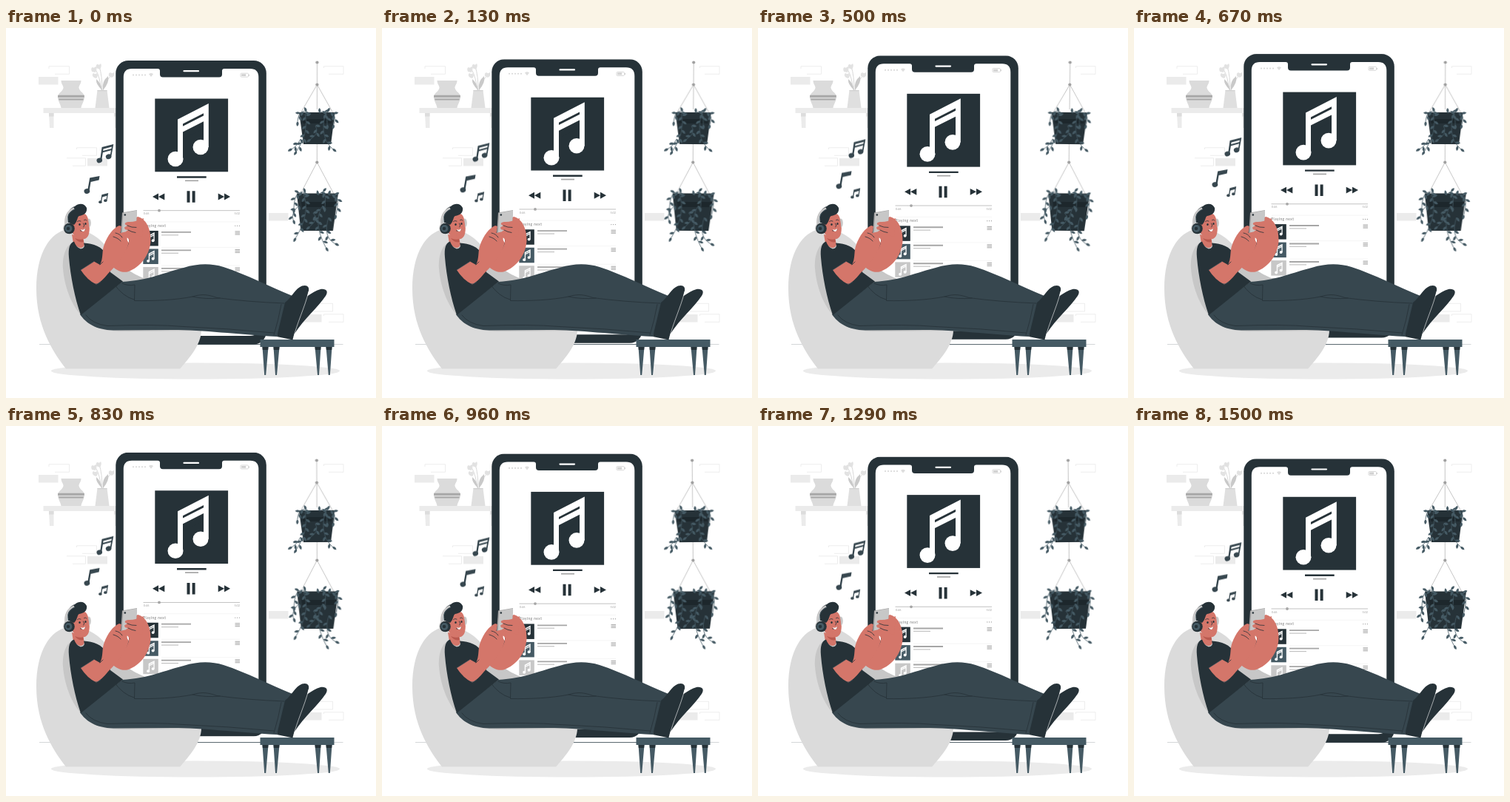
Animation, 500 px wide and 500 px high, one loop 1.54 s. Source, as an HTML page:

```html
<!DOCTYPE html>
<html lang="en">
<head>
<meta charset="utf-8">
<title>Relaxing with music</title>
<style>
  html, body { margin: 0; width: 100%; height: 100%; overflow: hidden; background: #fff; }
  svg { display: block; width: 100vw; height: 100vh; }
  text { font-family: Lato, "Open Sans", sans-serif; }
  .bob { animation: bob 1540ms linear infinite; }
  .swing { transform-origin: 420px 172px; animation: swing 1540ms linear infinite; }
  @keyframes bob {
    0%, 100% { transform: translateY(0); }
    47% { transform: translateY(-9.6px); }
    98.5% { transform: translateY(.5px); }
  }
  @keyframes swing {
    0%, 100% { transform: rotate(.08deg); }
    24% { transform: rotate(1deg); }
    73.5% { transform: rotate(-1deg); }
  }
  .ink { fill: #263238; }
  .slate { fill: #455a64; }
  .pale { fill: #ebebeb; }
  .skin { fill: #d4766a; }
  .line { fill: none; stroke: #263238; stroke-width: .8; stroke-linecap: round; stroke-linejoin: round; }
  .crease { fill: none; stroke: #263238; stroke-width: .8; stroke-linecap: round; }
  .brick { fill: none; stroke: #e6e6e6; stroke-width: .7; }
  .cord { fill: none; stroke: #b5b5b5; stroke-width: .8; }
</style>
</head>
<body>
<svg viewBox="0 0 500 500">
  <defs>
    <g id="note">
      <path d="M232 123.500L273.800 102V161H267V135L239 149V177H232Z"/>
      <ellipse cx="229" cy="177" rx="10.500" ry="10.300"/>
      <ellipse cx="263" cy="161" rx="10.500" ry="10.300"/>
    </g>
    <g id="cuts">
      <path d="M239 129.500L267 115.200V118.400L239 132.700ZM239 140.500L267 126.300V136L239 150Z"/>
    </g>
    <g id="row">
      <path fill="#a6a6a6" d="M210 275h40v1.800h-40Z"/>
      <path fill="#c2c2c2" d="M210 279.200h23v1.200h-23Z"/>
      <path fill="none" stroke="#999" stroke-width=".9" d="M309.500 275h6.500m-6.500 2h6.500m-6.500 2h6.500"/>
      <path stroke="#eee" stroke-width=".6" d="M210 296.500H316"/>
    </g>
    <path id="skip" class="ink" d="M198 228l8-4.400v8.800ZM206 228l8.300-4.400v8.800Z"/>
  </defs>

  <!-- wall -->
  <path class="pale" d="M44 66h26.500v10.500H44ZM110 176h27v10.500h-27ZM355 250h26.500v10.500H355ZM400 387h26.500v10.500H400Z"/>
  <path class="brick" d="M58 55V51.800H85.500V62.300H66M429.500 54V51.800H456V62.300H436M95.500 164V161.800H122.500V172.300H103M82 175.800H107.500V186.300H90M420 372.300H441.500V383H414.500M429.500 389V386.800H456V397.300H436"/>
  <path stroke="#37474f" stroke-width=".7" d="M45 427.600H455.500" opacity=".35"/>
  <path stroke="#37474f" stroke-width=".8" d="M258 427.600H344"/>

  <!-- shelf -->
  <path class="pale" d="M50.500 108H152v7H50.500ZM58 115h6.500v20H59ZM146 115h5v20h-4Z"/>
  <path fill="#dcdcdc" d="M58 115h6.500v4.500H58ZM146 115h4v4.500h-4Z"/>
  <path fill="#dbdbdb" d="M74.500 71H101.500C101.500 76 98 78 98.500 81C99.500 86 106 88 106 93C106 99 102 103 101.500 108H74.500C74 103 70 99 70 93C70 88 76.500 86 77.500 81C78 78 74.500 76 74.500 71Z"/>
  <path fill="#a8a8a8" d="M70.200 90.800H105.800V93.800H70ZM71 95.500H105L104.200 97.500H71.800Z"/>
  <path fill="none" stroke="#cfcfcf" stroke-width=".8" d="M129 85Q127 66 121 56M130 85Q130 64 126 52M131 85Q134 70 144 63"/>
  <path fill="#c9c9c9" d="M130 84Q121 76 122 69Q128 74 130 84ZM131 84Q129 72 138 65Q140 74 131 84Z"/>
  <path fill="#e2e2e2" d="M116 59Q114 54 117 53Q119 55 121 52Q124 54 121 60ZM122 54Q121 49 124 49Q126 51 128 48Q130 51 127 56ZM119 67Q115 64 118 61Q121 63 123 61Q125 65 122 68ZM139 65Q138 61 141 60Q143 62 146 60Q148 64 143 67Z"/>
  <path fill="#dfdfdf" d="M123.500 84H136.500L139.500 108H120.500Z"/>
  <path fill="#d0d0d0" d="M123.500 84h13v1.300h-13Z"/>

  <!-- big phone -->
  <g class="bob">
    <rect class="ink" x="148.300" y="44" width="203.500" height="383.500" rx="17"/>
    <path fill="#fff" d="M170 55H205Q208 55 208 58V62.500Q208 66.500 212 66.500H288Q292 66.500 292 62.500V58Q292 55 295 55H330Q341.300 55 341.300 66.500V405Q341.300 416 330 416H170Q158.800 416 158.800 405V66.500Q158.800 55 170 55Z"/>
    <path stroke="#fff" stroke-width="2.200" stroke-linecap="round" d="M240.500 58.200H260"/>
    <path stroke="#d9d9d9" stroke-width="2.200" stroke-linecap="round" stroke-dasharray="0 4" d="M172 63.500H189"/>
    <path fill="#dedede" d="M193 62.300Q196 59.800 199 62.300L196 66Z"/>
    <rect x="317" y="61.200" width="10.500" height="5" rx="1.200" fill="none" stroke="#d0d0d0" stroke-width=".8"/>
    <path fill="#d0d0d0" d="M318.200 62.300h6v2.800h-6ZM328 62.800h1v2h-1Z"/>

    <rect class="ink" x="201.300" y="95.500" width="98.800" height="98.800"/>
    <use href="#note" fill="#fff"/>
    <use href="#cuts" class="ink"/>
    <path class="ink" d="M231 200.300h39.700v2.400H231Z"/>
    <path fill="#a6a6a6" d="M242 205.500h18v1.700h-18Z"/>

    <use href="#skip"/>
    <use href="#skip" transform="matrix(-1 0 0 1 501 0)"/>
    <path class="ink" d="M244.500 220.300h4v15.500h-4ZM251.600 220.300h4v15.500h-4Z"/>
    <path stroke="#c2c2c2" stroke-width="1" d="M185.500 246.700H316"/>
    <circle cx="207" cy="246.700" r="1.900" fill="#a6a6a6"/>
    <g font-size="3.800" fill="#a0a0a0">
      <text x="185.800" y="252.300">0:46</text>
      <text x="316" y="252.300" text-anchor="end">5:02</text>
    </g>
    <path stroke="#eee" stroke-width=".6" d="M186 262H316"/>
    <text x="185.300" y="269" font-size="4.800" letter-spacing=".45" fill="#777">Playing next</text>
    <path stroke="#999" stroke-width="1.300" stroke-linecap="round" stroke-dasharray="0 2.800" d="M309.800 267.300H316"/>
    <g id="list"></g>
  </g>

  <!-- floating notes -->
  <g class="bob" fill="#37474f">
    <path d="M129.600 161L145.300 157L142.200 174L140.400 173.800L142 165.200L130.900 168.200L129 180L127 179ZM131.500 163.600L131.200 166L142.400 163L142.900 160.600Z" fill-rule="evenodd"/>
    <ellipse cx="126.300" cy="179" rx="3.800" ry="3.300" transform="rotate(-20 126 179)"/>
    <ellipse cx="138.600" cy="174" rx="3.800" ry="3.300" transform="rotate(-20 138 174)"/>
    <path d="M113.200 202.500L126.500 200L125.600 205.500L114.600 208L112.400 221L110 220.500Z"/>
    <ellipse cx="109.200" cy="220.600" rx="3.900" ry="3.400" transform="rotate(-20 109 220)"/>
    <path d="M129.400 225.300L138.200 223L136.400 233.500L135.200 233.300L136.400 226.800L130.200 228.400L129 236L127.800 235.500Z"/>
    <ellipse cx="127.400" cy="235.200" rx="2.200" ry="1.900"/>
    <ellipse cx="134.300" cy="233.200" rx="2.200" ry="1.900"/>
  </g>

  <!-- hanging plants -->
  <g class="swing">
    <path class="cord" d="M420.300 46.500V76.500L398 115M420.300 76.500L442 115M420.300 157V181.500L397 226M420.300 181.500L444 226M420.300 76.500V110"/>
    <g fill="#a0a0a0">
      <circle cx="420.300" cy="46.500" r="2.100"/><circle cx="420.300" cy="76.500" r="2.100"/><circle cx="420.300" cy="181.500" r="2.100"/>
    </g>
    <path class="ink" d="M396 114H444.500L439 157H402ZM393 223.500H449L442 274H398.500Z"/>
    <path fill="#1d272c" d="M400 123H441L440 129H401ZM399 235H446L445 242H400Z"/>
    <g id="vines"></g>
  </g>

  <!-- floor shadow, stool -->
  <ellipse class="pale" cx="256" cy="463.500" rx="195" ry="11"/>
  <path class="slate" d="M346.500 431H354.500L351.200 469H349.200ZM361.500 431H369.500L366 469H364ZM417.500 431H425.500L423 469H421ZM432.500 431H440.500L437.800 469H435.800Z"/>
  <path class="ink" d="M346.500 431h8l-.4 4h-7.300ZM361.500 431h8l-.4 4h-7.300ZM417.500 431h8l-.3 4h-7.300ZM432.500 431h8l-.3 4h-7.300Z"/>
  <path class="slate" d="M343.500 421H443.500V431H343.500Z"/>

  <!-- beanbag -->
  <path fill="#dbdbdb" d="M81 460.500C62 436 41 402 41 352C41 304 60 275 84 272C112 269 131 287 143 305C160 330 183 338 208 347L264 408C264 428 247 447 235 460.500Z"/>
  <path fill="#c7c7c7" d="M92 289C80 293 76 310 77 325C79 352 91 381 107 393C118 408 138 410 165 410L264 409L208 347C185 338 162 330 150 312Z"/>

  <!-- shoes and trousers -->
  <path class="ink" d="M386 372C402 369 413 356 425 353C433 352 436 356 432 362C421 378 403 393 390 413L380 408Z"/>
  <path fill="#37474f" d="M100 387L157 343C193 341 215 330 240 324C260 318 277 318 294 323C325 333 357 350 387 362L366 417C310 414 268 408 225 408L145 408.500C122 408 108 399 100 387Z"/>
  <path class="ink" d="M377 371C387 363 391 352 400 348.500C407 346.500 410 350 409 355C404 377 393 399 387.500 421.500L366 417Z"/>
  <path fill="none" stroke="#fff" stroke-width=".6" d="M409 356C404 377 393 399 388 420.500"/>
  <path class="crease" d="M157 345Q165 349 174 347L173.500 368.500C200 369 230 367.500 252 363C266 358.500 275 361 285 364.500Q325 370 376 372M146 346Q158 363 173 367M372 373.500Q368 395 362 415M108 388Q117 400 137 402.500Q200 400 240 403.500Q300 406 362 412M252 363Q270 367 289 365"/>

  <!-- head -->
  <path class="skin" d="M89 279L104 282L106 293Q102 302 91 291Z"/>
  <path fill="#b9594f" d="M93 284Q99 287 104 285L105 289Q98 291 93 284Z"/>
  <path class="skin" d="M87 256Q97 246 108 252C112 260 114 269 112 278C110 287 101 287 94 282L87 274Z"/>
  <ellipse cx="112" cy="263.500" rx="2.800" ry="6" fill="#c7c7c7"/>
  <path class="skin" d="M104 252Q110 251 111 259Q113.500 270 111 279Q108 286 100 285Z"/>
  <path class="ink" d="M84 263C82 250 86 243 93 241C99 236 106 237 109 243C110 249 106 253 99 254C96 255 97 261 92 266Z"/>
  <path fill="none" stroke="#c7c7c7" stroke-width="3" d="M81 267C79 255 84 247 92 243.500"/>
  <path fill="none" stroke="#455a64" stroke-width=".7" d="M83 264C82 254 86 248 93 245"/>
  <ellipse cx="83.500" cy="270.500" rx="6.200" ry="7.800" fill="#c7c7c7"/>
  <circle class="ink" cx="85.500" cy="271" r="7.300"/>
  <circle class="slate" cx="84.500" cy="271" r="5"/>
  <circle class="ink" cx="84" cy="271" r="2.300"/>
  <path class="line" stroke-width="1" d="M96.500 261.500Q98.500 259.500 101 261M105.500 259.500Q107.500 258 109 260M104.500 264Q107 268 104.500 269M100.500 274Q104 275.500 107 272.500"/>
  <path fill="#fff" d="M101 272Q104 274 107 271Q106.500 275 104 275Q102 275 101 272Z"/>
  <ellipse class="ink" cx="99.500" cy="265.500" rx="1.200" ry="1.600"/>
  <ellipse class="ink" cx="107.500" cy="264.500" rx="1.100" ry="1.500"/>

  <!-- far arm, shirt, handset, near arm -->
  <path class="skin" d="M140 318C150 330 160 332 168 328C184 321 195 304 195.500 287C196 270 188 257 178 255L163 263L160 285L166 287Q165 301 145 314Z"/>
  <path class="ink" d="M92 288.500C86 291 84 297 85 310C87 335 93 365 101 388L158 342.500L141 330L135 306C131 296 118 291 105 290.500Q108 298 101 298.500Q95 297 92 288.500Z"/>
  <path fill="#a6a6a6" d="M157 249.500L177 246L175.500 273L155 278.500Z"/>
  <path fill="#c7c7c7" d="M158.500 250L177 246.500L175.500 273L157 277.500Z"/>
  <circle class="ink" cx="160.800" cy="252.500" r="1.300"/>
  <path class="skin" d="M186 257C178 261 171 262.500 165 262C159 263 160 266 164 267L160 269.500Q160 273 165 273L162 275Q163 278 169 278L184 282Z"/>
  <path class="line" d="M164 267Q170 270 176 269.500M165 273Q170 276 175 276.500M166 287Q165 299 153 310" stroke-width=".6"/>
  <path class="skin" d="M101 327L119 315.500L127 320C132 311 129 301 133 292C137 281 145 270 153 267L156 268L154.500 277L163 275Q169 280 166 288C164 305 148 322 137 333Q130 342 122 346.500Q110 341 101 327Z"/>
  <path class="line" stroke="#8f443c" d="M148 277Q154 278 157 283M145 282Q152 284 155 288M127 320L131 316"/>
  <path fill="#fff" d="M163.500 283.500Q166.500 284 166 290Q163.500 288 163.500 283.500Z"/>
  <path fill="none" stroke="#455a64" stroke-width=".6" d="M101 327L119 315.500M120 345.500Q124 347 128 343"/>
</svg>
<script>
  const covers = ["#263238", "#455a64", "#c7c7c7", "#263238"];
  document.getElementById("list").innerHTML = covers.map((c, i) => `
    <g transform="translate(0 ${i * 24.5})">
      <rect x="185.300" y="274" width="20.500" height="20.500" fill="${c}"/>
      <g transform="translate(195.600 284.300) scale(.19) translate(-247 -145)">
        <use href="#note" fill="#fff"/><use href="#cuts" fill="${c}"/>
      </g>
      <use href="#row"/>
    </g>`).join("");

  // A curved stem with leaves on alternating sides.
  function vine([x0, y0, cx, cy, x1, y1, n]) {
    let out = `<path d="M${x0} ${y0}Q${cx} ${cy} ${x1} ${y1}" fill="none" stroke="#455a64" stroke-width=".8"/>`;
    for (let i = 0; i <= n; i++) {
      const t = i / n, u = 1 - t;
      const x = u * u * x0 + 2 * u * t * cx + t * t * x1;
      const y = u * u * y0 + 2 * u * t * cy + t * t * y1;
      const dir = Math.atan2(u * (cy - y0) + t * (y1 - cy), u * (cx - x0) + t * (x1 - cx));
      const turn = dir * 180 / Math.PI + (i === n ? 0 : i % 2 ? 50 : -50);
      out += `<path class="slate" transform="translate(${x.toFixed(1)} ${y.toFixed(1)}) rotate(${turn.toFixed(0)})" d="M0 0Q3-3.600 7-.4Q4 3 0 0Z"/>`;
    }
    return out;
  }
  const vines = [
    [412, 116, 396, 106, 394, 126, 5], [404, 114, 410, 142, 393, 166, 9],
    [398, 150, 393, 160, 387, 163, 3], [424, 115, 434, 106, 434, 130, 5],
    [434, 114, 448, 112, 443, 130, 5], [431, 118, 424, 148, 441, 163, 8],
    [418, 132, 424, 142, 412, 150, 4],
    [410, 226, 390, 212, 389, 244, 7], [402, 224, 412, 250, 392, 283, 10],
    [396, 240, 385, 250, 388, 259, 4], [422, 226, 434, 212, 431, 242, 6],
    [436, 226, 454, 220, 446, 252, 7], [428, 240, 414, 262, 432, 296, 9],
    [436, 256, 428, 282, 444, 291, 5], [415, 250, 424, 258, 411, 268, 4]
  ];
  document.getElementById("vines").innerHTML = vines.map(vine).join("");
</script>
</body>
</html>
```
